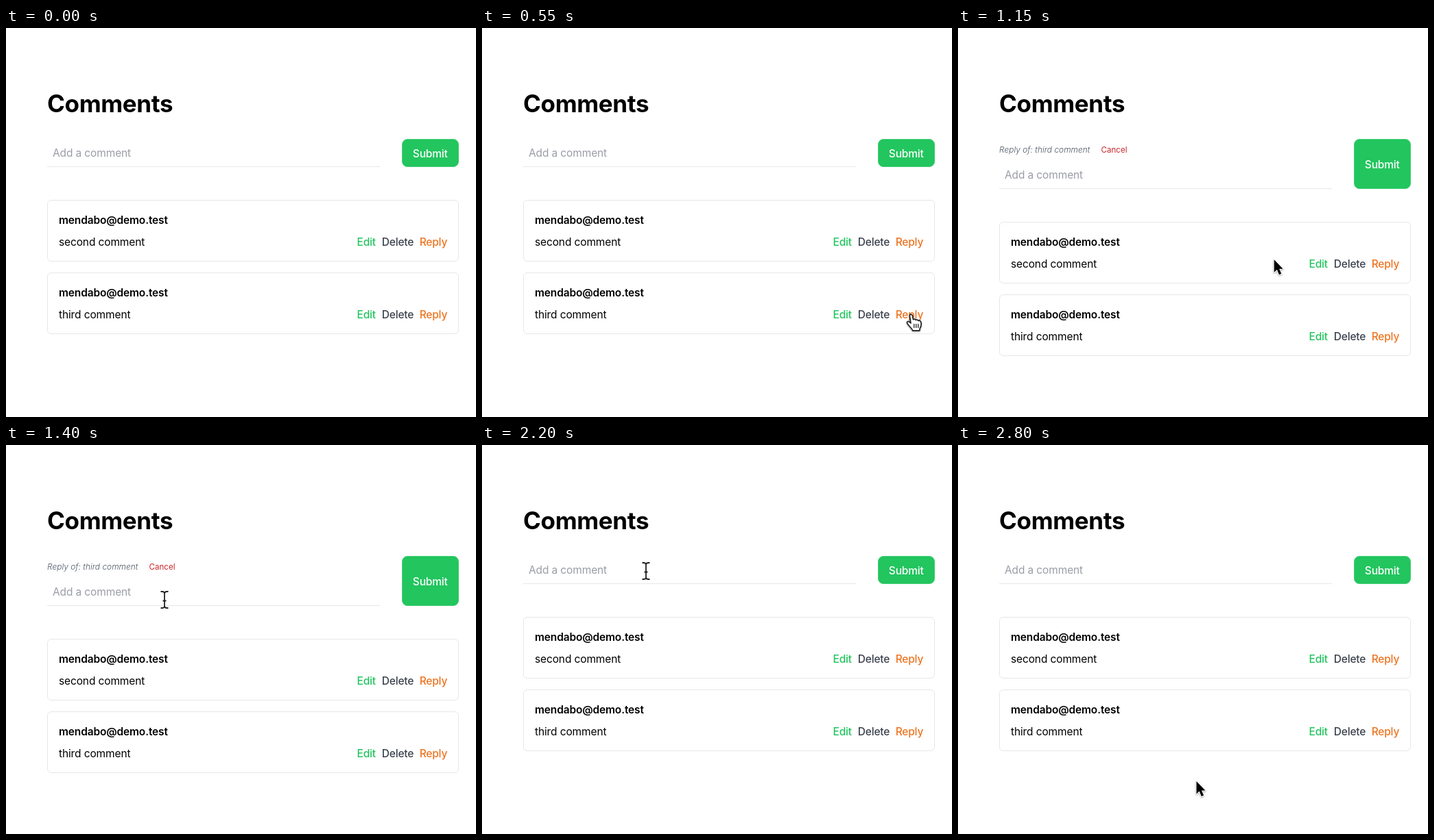
An HTML page that plays this animation: 685x568 px, repeating every 3.23 s.

```html
<!DOCTYPE html>
<html lang="en">
<head>
<meta charset="utf-8">
<title>Comments</title>
<style>
  html, body { margin: 0; width: 100%; height: 100%; overflow: hidden; background: #fff; }
  svg { display: block; }
  text {
    font: 400 15.5px Inter, "Liberation Sans", sans-serif;
    font-optical-sizing: none;
    letter-spacing: -.008em;
  }
  .title { font-size: 35px; font-weight: 700; letter-spacing: -.01em; }
  .hint { fill: #9a9da6; }
  .author { font-weight: 600; letter-spacing: -.01em; }
  .note { font-size: 11.9px; font-weight: 300; font-style: italic; fill: #4b5563; letter-spacing: .003em; }
  .cancel { font-size: 11.6px; fill: #c8262c; letter-spacing: 0; }
  .submit, .action { font-weight: 450; letter-spacing: -.013em; }
  .submit { fill: #fff; text-anchor: middle; }
  .button { fill: #22c55e; stroke: #43cf77; }
  .edit { fill: #22c55e; }
  .delete { fill: #3a404c; }
  .reply { fill: #ee7420; }
  .line { fill: none; stroke: #e5e7eb; }
  .cursor { filter: drop-shadow(0 1.5px 1.2px rgba(0, 0, 0, .35)); }
</style>
</head>
<body>
<svg width="685" height="568" viewBox="0 0 685 568">
  <defs>
    <path id="beamShape" d="M-5.5 -12H-3.5Q0 -12 0 -9Q0 -12 3.5 -12H5.5M0 -9V9M-5.5 12H-3.5Q0 12 0 9Q0 12 3.5 12H5.5M-2.5 1.5H2.5"/>
  </defs>
  <text class="title" x="60" y="123">Comments</text>
  <g id="replyBar">
    <text class="note" x="60" y="182">Reply of: third comment</text>
    <text class="cancel" x="208.5" y="182">Cancel</text>
  </g>
  <rect id="button" class="button" x="577.5" y="162.5" width="82" rx="7.5"/>
  <text id="submit" class="submit" x="618.2">Submit</text>
  <g id="shifted">
    <text class="hint" x="68" y="188">Add a comment</text>
    <path class="line" d="M60 202.5H545"/>
    <g id="cards"></g>
  </g>
  <g id="arrow" class="cursor">
    <path d="M0 0V18.5L4.2 14.6L7.3 22L10.6 20.6L7.5 13.4H13Z"
      fill="#000" stroke="#fff" stroke-width="2" paint-order="stroke" stroke-linejoin="round"/>
  </g>
  <g id="hand" class="cursor">
    <g transform="translate(-3 -1)" stroke="#222" stroke-width="1.7" stroke-linecap="round" stroke-linejoin="round">
      <path fill="#fff" d="M5.2 3.2C5.2 .6 8.6 .4 9.2 3L10.4 8.6C11.6 7.6 13.4 8 14 9.4C15.4 8.6 17 9 17.6 10.4C19.4 9.8 21.2 10.8 21.6 12.6C22.6 16 21.6 19.4 20 22L19.6 25H9.6C9 22 4 18.4 1.6 14.2C.6 11.8 3 10.6 5 12.4L6.8 14Z"/>
      <path fill="none" stroke-width="1.3" d="M11.6 15.5V20.5M14.6 15.5V20.5M17.6 15.5V20.5"/>
    </g>
  </g>
  <g id="beam" fill="none">
    <use href="#beamShape" stroke="#fff" stroke-width="3.4"/>
    <use href="#beamShape" stroke="#222" stroke-width="1.8"/>
  </g>
</svg>
<script>
const LOOP = 3230, STEP = 50, SHIFT = 32;
const ENTER = 200, REPLY_ON = 650, REPLY_OFF = 2200;
const $ = id => document.getElementById(id);

const entry = { x: 575, y: 533 };
const moves = [
  { from: 150, to: 400, x: 614, y: 417 },   // to Reply
  { from: 400, to: 650, x: 625, y: 418.5 },
  { from: 950, to: 1400, x: 231, y: 226 },  // to the field
  { from: 1450, to: 1700, x: 239, y: 184 }, // to Cancel
  { from: 2300, to: 2800, x: 347.5, y: 491 }
];

const card = (body, i) => `<g transform="translate(0 ${251 + 106 * i})">
  <rect class="line" x="60.5" y=".5" width="599" height="89" rx="5.5"/>
  <text class="author" x="77" y="35">mendabo@demo.test</text>
  <text x="77" y="67">${body}</text>
  <text class="action edit" x="511.5" y="67">Edit</text>
  <text class="action delete" x="547.8" y="67">Delete</text>
  <text class="action reply" x="602.7" y="67">Reply</text></g>`;
$('cards').innerHTML = ['second comment', 'third comment'].map(card).join('');

const ease = k => k * k * (3 - 2 * k);

function cursorAt(t) {
  let { x, y } = entry;
  for (const m of moves) {
    const k = ease(Math.min(1, Math.max(0, (t - m.from) / (m.to - m.from))));
    x += (m.x - x) * k;
    y += (m.y - y) * k;
  }
  return { x, y };
}

function cursorKind({ x, y }, replying) {
  const inside = (l, t, r, b) => x >= l && x <= r && y >= t && y <= b;
  const top = replying ? 162 + SHIFT : 162;
  if (inside(60, top, 545, top + 41)) return 'beam';
  const overLink = replying ? inside(208, 169, 247, 186) : inside(602, 406, 643, 430);
  return overLink ? 'hand' : 'arrow';
}

const show = (id, on) => $(id).setAttribute('visibility', on ? 'visible' : 'hidden');

function draw(now) {
  const t = Math.floor(now % LOOP / STEP) * STEP;
  const replying = t >= REPLY_ON && t < REPLY_OFF;
  const dy = replying ? SHIFT : 0;
  show('replyBar', replying);
  $('button').setAttribute('height', 40 + dy);
  $('submit').setAttribute('y', 189 + dy / 2);
  $('shifted').setAttribute('transform', `translate(0 ${dy})`);

  const pos = cursorAt(t);
  const kind = cursorKind(pos, replying);
  for (const id of ['arrow', 'hand', 'beam']) {
    show(id, t >= ENTER && id === kind);
    $(id).setAttribute('transform', `translate(${pos.x} ${pos.y})`);
  }
}

const start = performance.now();
function tick() {
  draw(performance.now() - start);
  requestAnimationFrame(tick);
}
tick();
</script>
</body>
</html>
```
